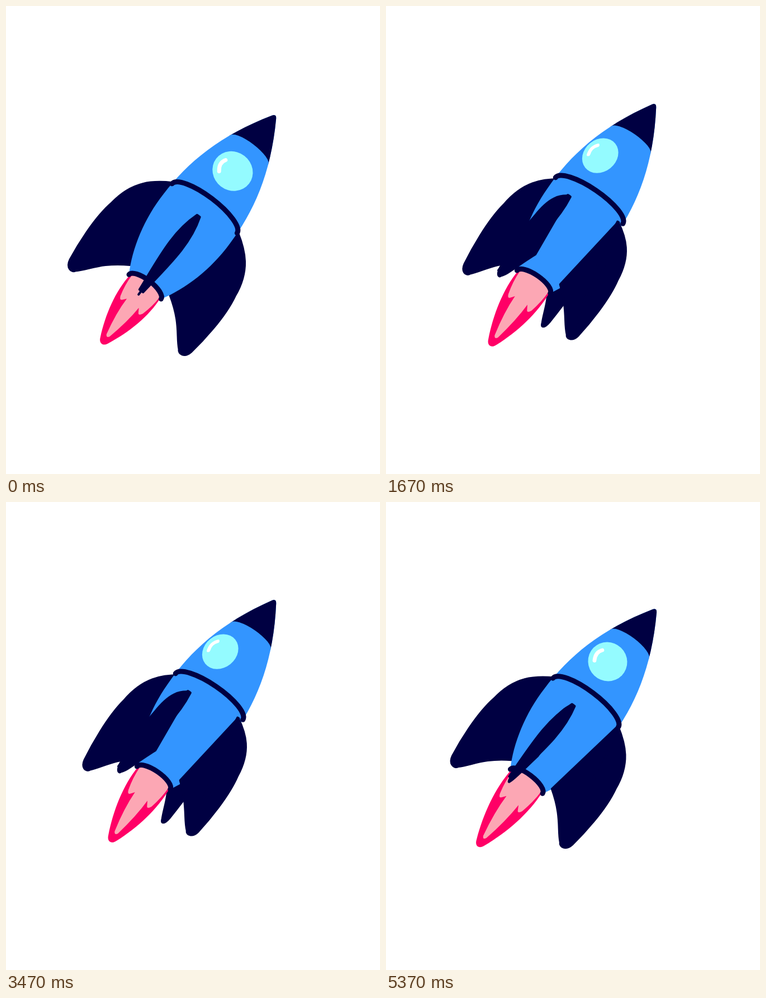
Animation, 669 px wide and 837 px high, one loop 5.41 s. Source, as an HTML page with a canvas:

```html
<!DOCTYPE html>
<html lang="en">
<head>
<meta charset="utf-8">
<title>Rocket</title>
<style>
  html, body { margin: 0; width: 100%; height: 100%; overflow: hidden; background: #fff; }
  canvas { display: block; width: 669px; height: 837px; }
</style>
</head>
<body>
<canvas id="stage"></canvas>
<script>
const W = 669, H = 837, LOOP = 5410, CYCLE = 900, STEP = 100 / 3;
const NAVY = '#000042', BLUE = '#3395ff', GLASS = '#94fbff', RED = '#ff0066', PINK = '#fca7b4';

const canvas = document.getElementById('stage');
const ctx = canvas.getContext('2d');
const dpr = window.devicePixelRatio || 1;
canvas.width = W * dpr;
canvas.height = H * dpr;
ctx.lineCap = ctx.lineJoin = 'round';

const rad = deg => deg * Math.PI / 180;
const wave = (t, peak, period = CYCLE) => Math.cos(2 * Math.PI * (t - peak) / period);

// Eased swing of the roll between -1 and 1
function swing(t) {
  const d = ((t + CYCLE / 2) % CYCLE + CYCLE) % CYCLE - CYCLE / 2;
  const half = CYCLE / 4;
  let a = Math.abs(d);
  if (a > half) a = 2 * half - a;
  return Math.sign(d) * (1 - Math.pow(1 - a / half, 3));
}

function fill(color, path) {
  ctx.fillStyle = color;
  ctx.fill(path);
}

function ring(y, rx, ry, width) {
  ctx.beginPath();
  ctx.ellipse(0, y, rx, ry, 0, Math.PI, 2 * Math.PI);
  ctx.strokeStyle = NAVY;
  ctx.lineWidth = width;
  ctx.stroke();
}

// Upright body: x across, y from the nose down
function hullPath() {
  const p = new Path2D();
  p.moveTo(-4.6, 0.5);
  p.quadraticCurveTo(0, -6.5, 4.6, 0.5);
  p.bezierCurveTo(57, 85, 74, 158, 74, 230);
  p.bezierCurveTo(75, 285, 60, 342, 36, 382);
  p.ellipse(0, 382, 36, 13, 0, 0, Math.PI, true);
  p.bezierCurveTo(-60, 342, -75, 285, -74, 230);
  p.bezierCurveTo(-74, 158, -57, 85, -4.6, 0.5);
  p.closePath();
  return p;
}
const hull = hullPath();

function drawHull() {
  fill(BLUE, hull);
  ctx.save();
  ctx.clip(hull);
  const nose = new Path2D();
  nose.moveTo(-60, -10);
  nose.lineTo(-60, 75);
  nose.lineTo(-43, 75);
  nose.ellipse(0, 75, 43, 13, 0, Math.PI, 2 * Math.PI);
  nose.lineTo(60, 75);
  nose.lineTo(60, -10);
  fill(NAVY, nose);
  ctx.restore();
}

function drawWindow(roll) {
  const s = Math.sin(roll), c = Math.cos(roll);
  ctx.save();
  ctx.translate(62 * s, 122.5 + 50 * (1 - c));
  ctx.rotate(-0.62 * s);
  ctx.scale(c * c, 1);
  ctx.beginPath();
  ctx.ellipse(0, 0, 37, 34.5, 0, 0, 2 * Math.PI);
  ctx.fillStyle = GLASS;
  ctx.fill();
  ctx.beginPath();
  ctx.moveTo(-19, 15);
  ctx.quadraticCurveTo(-29, 3, -22, -8);
  ctx.strokeStyle = '#fff';
  ctx.lineWidth = 7;
  ctx.stroke();
  ctx.restore();
}

function drawFin(angle) {
  const s = Math.sin(angle), c = Math.max(0, Math.cos(angle)), q = c * c;
  // u runs along the body, r is the distance from its axis
  const at = (u, r) => [r * s, u + q * (42 * (434 - u) / 230 - 0.31 * r)];
  const p = new Path2D();
  const curve = (...k) => p.bezierCurveTo(...at(k[0], k[1]), ...at(k[2], k[3]), ...at(k[4], k[5]));
  const top = at(204, 73), tip = at(431, 128);
  p.moveTo(...top);
  curve(222, 103, 245, 132, 298, 138);
  curve(340, 147, 400, 140, 425, 136);
  curve(440, 133, 442, 120, 434, 116);
  curve(418, 98, 395, 90, 367 - 36 * q, 45 + 11 * q);
  p.closePath();
  fill(NAVY, p);
  ctx.strokeStyle = NAVY;
  ctx.lineWidth = 4;
  ctx.stroke(p);
  if (c < 0.1) return;

  // Thickness of a fin that faces the viewer
  const side = (f, w) => [top[0] + (tip[0] - top[0]) * f + w * c, top[1] + (tip[1] - top[1]) * f];
  const leaf = new Path2D();
  leaf.moveTo(...side(0, -3));
  leaf.bezierCurveTo(...side(0.3, -20), ...side(0.6, -11), ...side(1, -4));
  leaf.lineTo(...side(1, 4));
  leaf.bezierCurveTo(...side(0.6, 11), ...side(0.3, 20), ...side(0, 3));
  leaf.closePath();
  fill(NAVY, leaf);
  ctx.stroke(leaf);
}

function drawFlame(end) {
  ctx.save();
  ctx.translate(0, 376);
  ctx.scale(1, (end - 376) / 135);
  const outer = new Path2D();
  outer.moveTo(-34, 4);
  outer.bezierCurveTo(-38, 45, -26, 90, -9, 127);
  outer.bezierCurveTo(-5, 137.5, 5, 137.5, 9, 127);
  outer.bezierCurveTo(26, 90, 38, 45, 34, 4);
  outer.quadraticCurveTo(0, -24, -34, 4);
  fill(RED, outer);

  const inner = new Path2D();
  inner.moveTo(-31, 5);
  inner.quadraticCurveTo(-31, 25, -25, 46);
  inner.quadraticCurveTo(-22, 54, -18, 49);
  inner.lineTo(-13, 43);
  inner.quadraticCurveTo(-13, 75, -3.5, 116);
  inner.quadraticCurveTo(0, 122, 3.5, 116);
  inner.quadraticCurveTo(13, 75, 14, 43);
  inner.lineTo(19, 51);
  inner.quadraticCurveTo(22, 55, 26, 47);
  inner.quadraticCurveTo(32, 25, 32, 5);
  inner.quadraticCurveTo(0, -22, -31, 5);
  fill(PINK, inner);
  ctx.restore();
}

function draw(t) {
  const roll = rad(30 * swing(t - 1));
  const lean = rad(37.3 - 5.6 * (1 - wave(t, 20)));
  ctx.setTransform(dpr, 0, 0, dpr, 0, 0);
  ctx.fillStyle = '#fff';
  ctx.fillRect(0, 0, W, H);
  ctx.translate(470 + 11 * wave(t, 835), 176 + 26 * wave(t, 80));
  ctx.rotate(lean);

  const fins = [-90, 0, 90, 180].map(a => roll + rad(a));
  const front = a => Math.cos(a) > 0.1;
  fins.filter(a => !front(a)).forEach(drawFin);
  drawFlame(520 + 11 * wave(t, 852, CYCLE / 8));
  drawHull();
  drawWindow(roll);
  ring(206, 73, 22, 9);
  ring(382, 36, 13, 9);
  fins.filter(front).forEach(drawFin);
}

const start = performance.now();
function tick() {
  const t = (performance.now() - start) % LOOP;
  const n = Math.min(161, Math.floor((t + 4) / STEP));
  draw((n % 27) * STEP);
  requestAnimationFrame(tick);
}
tick();
</script>
</body>
</html>
```
